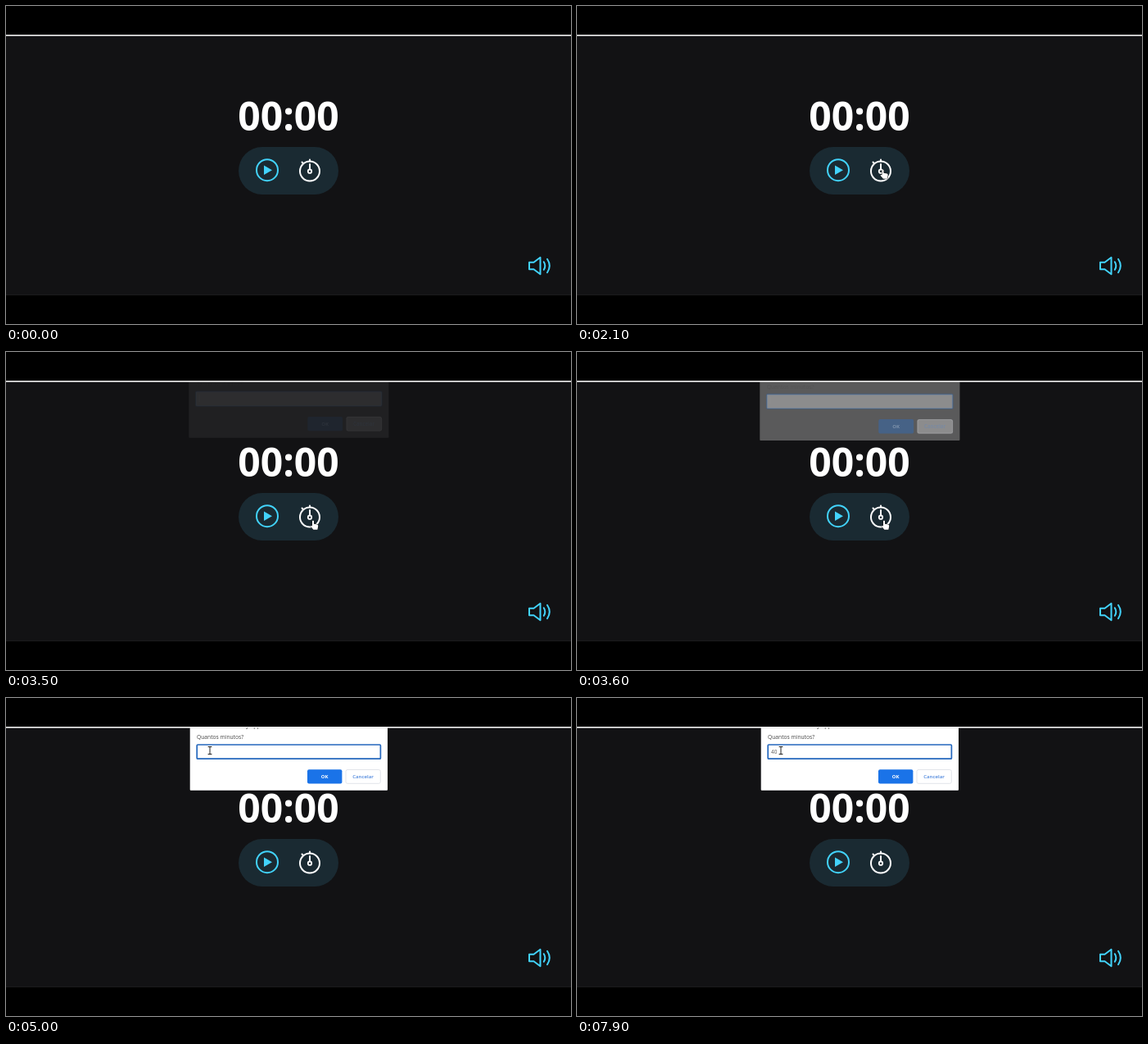
Write an HTML page with a canvas that moves like this. It is 690 px wide and 388 px high and loops after 8000 ms.

```html
<!DOCTYPE html>
<html lang="pt">
<head>
<meta charset="utf-8">
<title>Timer</title>
<style>
  html, body { margin: 0; width: 100%; height: 100%; overflow: hidden; background: #000; }
  canvas { display: block; width: 100vw; height: 100vh; }
</style>
</head>
<body>
<canvas id="stage" width="690" height="388"></canvas>
<script>
const ctx = document.getElementById('stage').getContext('2d');
const LOOP = 8000, STEP = 100;
const CYAN = '#42d3fb', BLUE = '#1a73e8', WHITE = '#fff';
const SANS = '"Open Sans", "Noto Sans", sans-serif';

// Pointer path: time, x, y
const PATH = [
  [800, 112, 283], [1000, 230, 287], [1200, 350, 283], [1400, 453, 220],
  [1600, 433, 168], [1700, 424, 160], [1900, 388, 180], [2100, 373.5, 199.5],
  [2300, 368, 204], [2500, 373, 203.5], [2800, 375, 205.5], [3900, 375, 205.5],
  [4100, 366, 160], [4300, 312, 92], [4500, 258, 54], [4700, 249, 64]
];
// Times at which the caret flips, starting from hidden
const BLINKS = [3500, 4000, 4500, 5000, 5600, 6100, 6600, 7900];

function box(x, y, w, h, r, fill, stroke, line = 1) {
  ctx.beginPath();
  ctx.roundRect(x, y, w, h, r);
  if (fill) { ctx.fillStyle = fill; ctx.fill(); }
  if (stroke) { ctx.strokeStyle = stroke; ctx.lineWidth = line; ctx.stroke(); }
}

function text(str, x, y, size, color, weight = 400, align = 'left') {
  ctx.font = `${weight} ${size}px ${SANS}`;
  ctx.textAlign = align;
  ctx.fillStyle = color;
  ctx.fillText(str, x, y);
}

function stroke(d, color, line) {
  ctx.strokeStyle = color;
  ctx.lineWidth = line;
  ctx.stroke(new Path2D(d));
}

function ring(x, y, r, color, line) {
  ctx.beginPath();
  ctx.arc(x, y, r, 0, Math.PI * 2);
  ctx.strokeStyle = color;
  ctx.lineWidth = line;
  ctx.stroke();
}

function drawPage() {
  ctx.fillStyle = '#000';
  ctx.fillRect(0, 0, 690, 388);
  ctx.fillStyle = '#121214';
  ctx.fillRect(0, 36, 690, 316);
  ctx.fillStyle = '#1a1a1c';
  ctx.fillRect(0, 352, 690, 1);
  ctx.fillStyle = '#f4f4f4';
  ctx.fillRect(0, 35, 690, 1.6);

  text('00:00', 345, 152, 48, WHITE, 700, 'center');
  box(284, 172, 122, 58, 29, '#1a2a32');

  ctx.lineCap = ctx.lineJoin = 'round';
  ring(319, 200.2, 13, CYAN, 2);
  ctx.fillStyle = CYAN;
  ctx.fill(new Path2D('M315 194.6 L325 200.3 L315 206 Z'));

  ring(371, 201.5, 12, WHITE, 2);
  ring(371, 201.7, 2.2, WHITE, 1.8);
  stroke('M371 187.4V189.5M371 193V199M361.5 190.5L363 192', WHITE, 2);

  stroke('M639 312.8H644.5L652.5 306.8V327.2L644.5 321.2H639Z', CYAN, 2);
  stroke('M656.8 312.2Q659.8 317 656.8 321.8M661 308.8Q666.6 317 661 325.2', CYAN, 2);
}

function drawDialog(t) {
  if (t < 3500) return;
  ctx.save();
  ctx.beginPath();
  ctx.rect(0, 36.2, 690, 316);
  ctx.clip();
  if (t < 3700) {
    const early = t < 3600;
    ctx.globalAlpha = early ? 0.06 : 0.3;
    ctx.translate(345.5, early ? -9 : -5.8);
    ctx.scale(1.012, 1.008);
    ctx.translate(-345.5, 0);
  }
  box(224.7, 20, 241.3, 92.8, 1, WHITE);
  text('y.app', 293, 36, 7.2, '#333');
  text('Quantos minutos?', 233, 50, 6.7, '#444');
  box(233.2, 57, 224.2, 17.2, 1, WHITE, '#2467bd', 1.7);
  box(368, 87.2, 42.4, 17.2, 2, BLUE);
  text('OK', 389.2, 98.1, 6, WHITE, 700, 'center');
  box(415, 87.5, 42.3, 16.8, 2, WHITE, '#e2e4ea');
  text('Cancelar', 436, 98.1, 6.1, '#4a84dc', 600, 'center');

  const typed = t < 7200 ? '' : t < 7300 ? '4' : '40';
  text(typed, 237, 68, 6.4, '#555');
  if (BLINKS.filter(b => t >= b).length % 2) {
    ctx.fillStyle = '#999';
    ctx.fillRect(237 + typed.length * 3.6, 60.5, 0.8, 9);
  }
  ctx.restore();
}

function pointerAt(t) {
  const last = PATH.length - 1;
  if (t >= PATH[last][0]) return PATH[last].slice(1);
  const i = PATH.findIndex(p => p[0] > t) - 1;
  const [t0, x0, y0] = PATH[i], [t1, x1, y1] = PATH[i + 1];
  const k = (t - t0) / (t1 - t0);
  return [x0 + (x1 - x0) * k, y0 + (y1 - y0) * k];
}

function drawPointer(t) {
  if (t < 800) return;
  const [x, y] = pointerAt(t);
  const onTimer = t < 4000 && Math.hypot(x - 371, y - 201) < 15;
  const onInput = t > 4000 && x < 458 && y > 57 && y < 75;
  ctx.save();
  ctx.translate(x, y);
  if (onInput) {
    stroke('M-2 -4.5H2M0 -4.5V4.5M-2 4.5H2', '#222', 1);
  } else {
    const shape = new Path2D(onTimer
      ? 'M-1 0.8Q0 -0.6 1 0.8V4.2L5.2 5Q6.4 5.4 6.2 7L5.4 11.2H0.4L-3 7.2Q-2.6 5.8 -1 6.8Z'
      : 'M0 0V10.5L2.5 8.3L4.2 12L5.8 11.3L4.2 7.7H7.5Z');
    ctx.lineWidth = 1;
    ctx.strokeStyle = '#111';
    ctx.stroke(shape);
    ctx.fillStyle = WHITE;
    ctx.fill(shape);
  }
  ctx.restore();
}

const start = performance.now();
function frame() {
  const now = (performance.now() - start) % LOOP;
  const t = Math.floor(now / STEP) * STEP;
  drawPage();
  drawDialog(t);
  drawPointer(t);
  requestAnimationFrame(frame);
}
frame();
</script>
</body>
</html>
```
